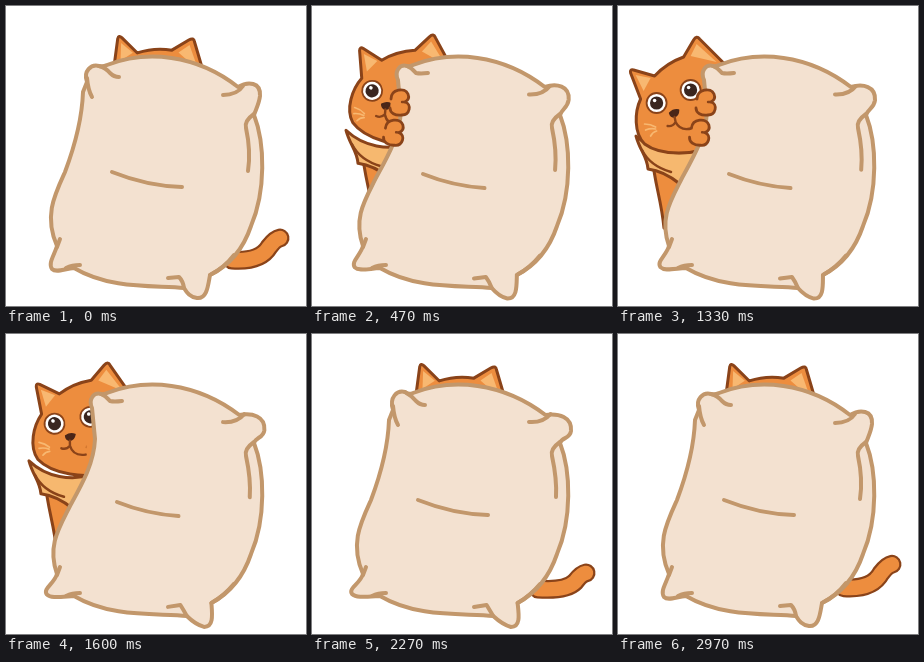
An HTML page with a canvas for the animation above (3.01 s loop, 300 px wide and 300 px high).

```html
<!DOCTYPE html>
<html lang="en">
<head>
<meta charset="utf-8">
<title>Cat behind a pillow</title>
<style>
html, body { margin: 0; width: 100%; height: 100%; overflow: hidden; background: #fff; }
canvas { display: block; width: 100vw; height: 100vh; }
</style>
</head>
<body>
<canvas id="stage" width="300" height="300"></canvas>
<script>
const canvas = document.getElementById('stage');
const ctx = canvas.getContext('2d');
const LOOP = 3010;
const FUR = '#ed8d3e', LIGHT = '#f8b871', SCARF = '#f6b86f', DARK = '#8a4319';
const PILLOW = '#f3e1d0', SEAM = '#c2976b';

const clamp = k => Math.max(0, Math.min(1, k));
const mix = (a, b, k) => a + (b - a) * k;

// Eased rise from 0 to 1 between two times.
function rise(t, from, to) {
  const u = clamp((t - from) / (to - from));
  return u * u * (3 - 2 * u);
}

// Soft bump around a time, for overshoot and anticipation.
const bump = (t, at, width) => Math.exp(-(((t - at) / width) ** 2));

function pose(t) {
  const peek = rise(t, 300, 595) - rise(t, 1525, 1780)
    + .04 * (bump(t, 660, 70) + bump(t, 1510, 50))
    - .05 * bump(t, 270, 60) - .11 * bump(t, 1830, 90);
  return {
    peek,
    out: Math.max(0, peek),
    sway: rise(t, 0, 900) - .4 * bump(t, 1330, 250) - rise(t, 2690, 2970),
    fold: rise(t, 200, 450) - rise(t, 1850, 2250),
    dent: clamp(peek * 1.6),
    grip: rise(t, 380, 450) - rise(t, 1540, 1610),
    wag: Math.sin(t / LOOP * 6 * Math.PI)
  };
}

function shape(d, fill, line, width = 3) {
  const p = new Path2D(d);
  if (fill) { ctx.fillStyle = fill; ctx.fill(p); }
  if (line) { ctx.strokeStyle = line; ctx.lineWidth = width; ctx.stroke(p); }
}

function disc(x, y, r, fill, line, width = 1.8) {
  ctx.beginPath();
  ctx.arc(x, y, r, 0, Math.PI * 2);
  ctx.fillStyle = fill;
  ctx.fill();
  if (line) { ctx.strokeStyle = line; ctx.lineWidth = width; ctx.stroke(); }
}

function placed(draw, x, y, angle = 0) {
  ctx.save();
  ctx.translate(x, y);
  ctx.rotate(angle);
  draw();
  ctx.restore();
}

function tail(wag) {
  const y = 232 + 7 * wag;
  const d = `M226 ${254 + wag}Q254 ${256 + wag} 263 ${y + 9}Q269 ${y + 1} 274 ${y}`;
  shape(d, null, DARK, 19);
  shape(d, null, FUR, 14.5);
}

function body() {
  shape('M34 150C37 180 43 192 46 222L110 222V150Z', FUR, DARK);
  shape('M18 130C22 145 29 150 30 163Q46 165 62 178L84 176L100 150L82 144C60 150 36 147 18 130Z', SCARF, DARK);
  shape('M24 144Q32 160 53 166', null, DARK, 2.5);
}

function eye(x, y) {
  disc(x, y, 10, '#fff', DARK);
  disc(x, y, 6.6, '#3a2620');
  disc(x - 2, y - 2.5, 1.8, '#fff');
}

function face() {
  eye(38, 97);
  eye(72, 84);
  shape('M51 107Q55 103 60 104Q60 109 56 111Q52 111 51 107Z', '#4a2618', '#4a2618', 1.5);
  shape('M56 111L57 116Q54 121 49 120M57 116Q62 126 74 122', null, DARK, 2.4);
  shape('M26 118Q32 118 37 121M27 124Q32 122 37 123M32 130Q34 126 38 125', null, LIGHT, 1.7);
}

// Drawn in the full peek pose, turned about the point between the ear tips.
function head({ peek, out, sway }) {
  const tilt = 2 - 28.6 * out ** 1.8 - 40 * Math.min(0, peek);
  const turn = clamp((1 - peek) * 3);
  placed(() => {
    ctx.translate(-45, -47.5);
    shape('M22 93L12 67Q11 63 15 64L36 70Q48 57 65 51L75 34Q78 29 81 33L108 60C118 84 116 122 96 138C78 150 42 150 26 138C15 127 16 106 22 93Z', FUR, DARK);
    shape('M25 85L17 69L32 72Z', LIGHT);
    shape('M72 50L78 38L98 56Z', LIGHT);
    placed(face, -2.5 * turn, 5 * turn);
  }, 150 - 4 * sway - 102 * peek, 31.5 + 16 * out ** 3, (tilt + 26.6) * Math.PI / 180);
}

function pillow({ sway: w, fold, dent }) {
  const m = (a, b) => mix(a, b, dent);
  const up = -2 * w * (1 - dent);
  const rx = 5 * w, ry = 7 * w, lx = -6 * w, ly = -3 * w, bx = 8 * w;
  shape(`M${m(81, 86)} ${m(76, 74)}
    C${m(77, 82)} ${65 + up} ${m(85, 88)} ${58 + up} ${m(93, 95)} ${60 + up}Q97 61 101 59
    C140 44 190 48 ${232 + rx * .3} 81
    C${242 + rx} ${75 + ry * .6} ${255 + rx} ${76 + ry} ${254 + rx} ${90 + ry}
    C${253 + rx} ${98 + ry} 250 103 248 109
    C259 137 260 185 245 220C237 244 222 260 ${204 + bx * .2} 269
    C${202 + bx * .6} 280 ${201 + bx} 293 ${191 + bx} ${292 + w}
    C${184 + bx} 291 ${181 + bx * .7} 287 ${178 + bx * .4} 282
    C150 279 105 284 68 262
    C${58 + lx} 263 ${50 + lx} ${267 + ly} ${46 + lx} ${263 + ly}
    C${42 + lx} ${257 + ly} 48 250 51 240
    C${m(38, 41)} ${m(210, 212)} ${m(48, 53)} ${m(190, 194)} ${m(59, 64)} ${m(166, 172)}
    C${m(68, 75)} ${m(142, 152)} ${m(76, 88)} ${m(115, 130)} ${m(77, 89)} ${m(86, 105)}Z`, PILLOW, SEAM, 4);
  const creases = [
    `M${m(93, 95)} ${60 + up}Q100 62 104 67Q108 ${m(71, 68)} ${m(113, 116)} ${m(71, 67)}`,
    `M217 ${89 - w}Q231 89 ${237 + rx * .3} 80`,
    `M248 108Q238 115 240 122Q245 145 ${242 + 2 * w} ${165 - 2 * w}`,
    `M162 ${272 + w}L${173 + bx * .2} 271Q177 275 ${178 + bx * .4} 282`,
    `M${204 + bx * .2} 269Q218 262 228 ${249 + w}`,
    'M74 259Q66 259 60 262M51 241L54 233',
    `M${106 + 5 * fold} ${166 + 2 * fold}Q141 180 ${176 - 3.5 * fold} ${181 + fold}`
  ];
  if (dent < .5) creases.push('M81 72Q82 84 86 91');
  shape(creases.join(''), null, SEAM, 4);
}

function paw() {
  shape('M-8 -4C-8 -14 6 -16 9 -9C11 -4 8 -2 6 -1C13 1 11 12 3 12C-4 13 -9 10 -9 5', FUR, DARK, 2.8);
  shape('M6 -1L3 -1', null, DARK, 2.4);
}

function paws(grip) {
  if (grip < .03) return;
  placed(() => {
    ctx.scale(grip, grip);
    placed(paw, 7, -16);
    placed(paw, 1, 14, .1);
  }, 80, 113);
}

function draw(t) {
  const p = pose(t);
  ctx.fillStyle = '#fff';
  ctx.fillRect(0, 0, 300, 300);
  ctx.lineCap = ctx.lineJoin = 'round';
  placed(() => tail(p.wag), -100 * p.out, 0);
  placed(body, 110 * (1 - p.peek) ** 2, -15 * (1 - p.peek));
  head(p);
  pillow(p);
  paws(p.grip);
}

const start = performance.now();
function tick() {
  draw((performance.now() - start) % LOOP);
  requestAnimationFrame(tick);
}
tick();
</script>
</body>
</html>
```
